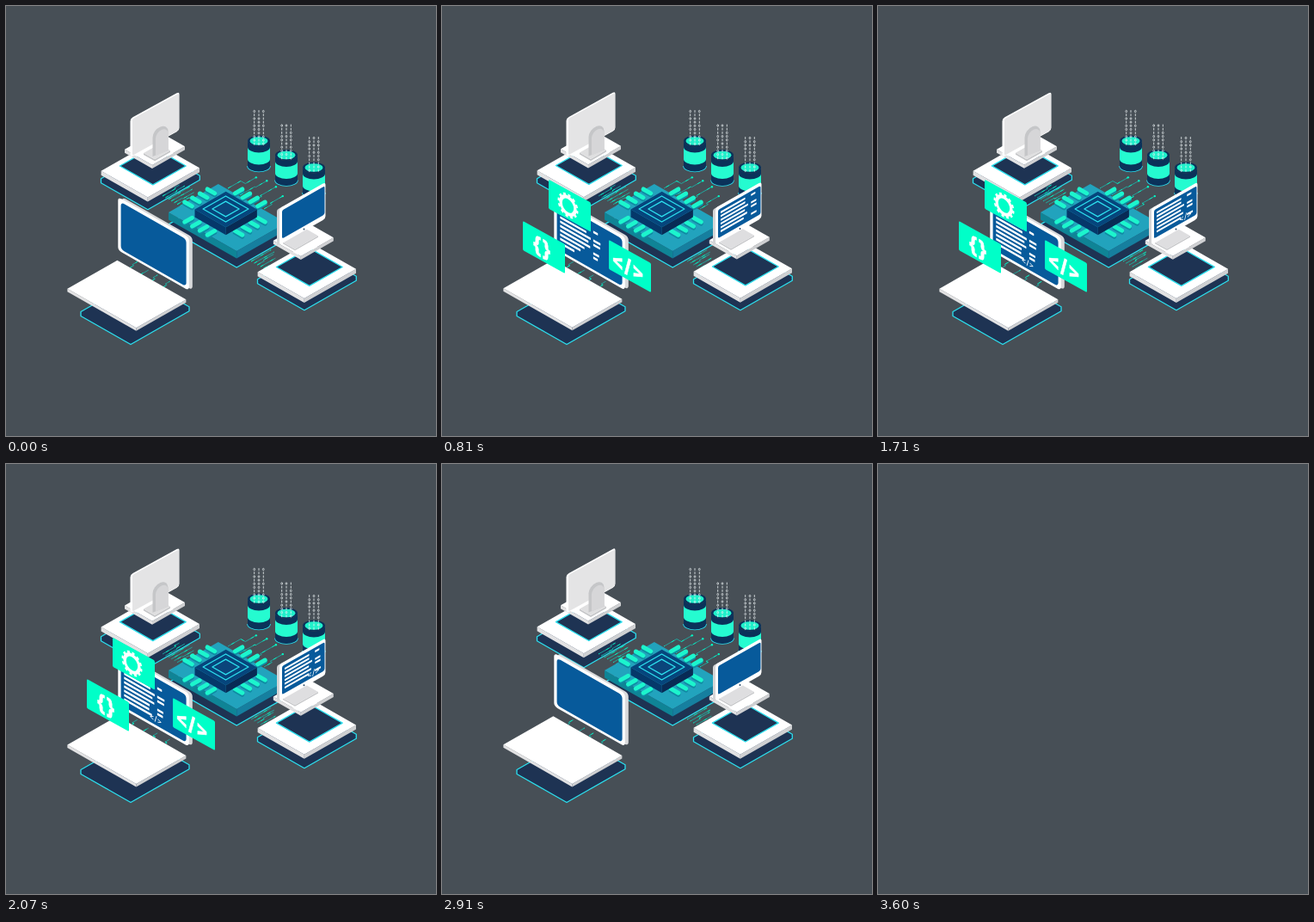
Write an HTML page that moves like this. It is 500 by 500 pixels and loops after 3630 ms.

```html
<!DOCTYPE html>
<html lang="en">
<head>
<meta charset="utf-8">
<title>Connected devices</title>
<style>
html, body { margin: 0; width: 100%; height: 100%; overflow: hidden; background: #474f56; }
svg { display: block; width: 100vw; height: 100vh; }
text { font-family: Inter, "Open Sans", sans-serif; font-weight: 800; text-anchor: middle; fill: #fff; }
</style>
</head>
<body>
<svg id="stage" viewBox="0 0 500 500"></svg>
<script>
const LOOP = 3630, STEP = 30, HOLD = 90, REST = 3420, BLANK = 3600;
const BOB = 2.7, BOB_PERIOD = (REST - HOLD) / 4;
const NAVY = '#1e3353', CYAN = '#2ce0ee', MINT = '#00ffc8', BLUE = '#075a9b', TEAL = '#1bb9ae';
const SLOPE = .57;
const stage = document.getElementById('stage');

let seed = 7;
const rand = () => (seed = seed * 16807 % 2147483647) / 2147483647;
const repeat = (n, f) => Array.from({ length: n }, (_, i) => f(i)).join('');

const group = (body, attrs) => `<g ${attrs}>${body}</g>`;
const at = (x, y, body) => group(body, `transform="translate(${x} ${y})"`);
const skew = (x, y, slope, body) => group(body, `transform="matrix(1 ${slope} 0 1 ${x} ${y})"`);
const rect = (x, y, w, h, rx, fill, more = '') =>
  `<rect x="${x}" y="${y}" width="${w}" height="${h}" rx="${rx}" fill="${fill}" ${more}/>`;
const path = (d, stroke, w, more = '') =>
  `<path d="${d}" fill="none" stroke="${stroke}" stroke-width="${w}" ${more}/>`;
const poly = (pts, fill, stroke = 'none', w = 1.3) =>
  `<polygon points="${pts.join(' ')}" fill="${fill}" stroke="${stroke}" stroke-width="${w}" stroke-linejoin="round"/>`;

// Ground point: a runs right and down, b runs right and up
const iso = (x, y, a, b) => [x + a + b, y + SLOPE * (a - b)];
const drop = ([x, y], d) => [x, y + d];
// Corners left, top, right, bottom of a tile with half sides a and b
const corners = (x, y, a, b) => [iso(x, y, -a, -b), iso(x, y, -a, b), iso(x, y, a, b), iso(x, y, a, -b)];
const tile = (x, y, a, b, fill, stroke) => poly(corners(x, y, a, b), fill, stroke);

function box(x, y, a, b, depth, top = '#fff', left = '#e2e2e3', right = '#cfd0d2') {
  const [l, , r, f] = corners(x, y, a, b);
  return poly([l, f, drop(f, depth), drop(l, depth)], left) +
    poly([f, r, drop(r, depth), drop(f, depth)], right) + tile(x, y, a, b, top);
}

function shadow(x, y, a, b) {
  const [l, t, r, f] = corners(x, y, a, b);
  return poly([l, t, r, drop(r, 5), drop(f, 5), drop(l, 5)], NAVY, CYAN);
}

// Parallel circuit tracks with a small jog in each
function tracks(x, y, n, gap, len, dots) {
  let d = '', ends = '';
  for (let i = 0; i < n; i++) {
    const a = i * gap, jog = (rand() - .5) * gap * .9, mid = len * (.3 + .4 * rand()), end = len * (.8 + .4 * rand());
    const pts = [iso(x, y, a, 0), iso(x, y, a, mid), iso(x, y, a + jog, mid), iso(x, y, a + jog, end)];
    d += 'M' + pts.join('L');
    if (dots) ends += `<circle cx="${pts[3][0]}" cy="${pts[3][1]}" r="1.2" fill="${MINT}"/>`;
  }
  return path(d, TEAL, .8) + path(d, MINT, .8, 'class="pulse" stroke-dasharray="4 9"') + ends;
}

function chip() {
  const x = 254.5, y = 239.6, near = 25, far = 33.5;
  const pins = repeat(4, i => {
    const s = 8.8 * (i - 1.5);
    return [-1, 1].map(k =>
      `M${iso(x, y, k * near, s)}L${iso(x, y, k * far, s)}M${iso(x, y, s, k * near)}L${iso(x, y, s, k * far)}`).join('');
  });
  return box(257.5, 246, 39.6, 28.9, 8.5, '#22a3bd', '#0f8496', '#167f9f') +
    at(0, 2, path(pins, '#0f8ba3', 5, 'stroke-linecap="round"')) +
    path(pins, '#1cf5cd', 5, 'stroke-linecap="round"') +
    box(255.7, 236.5, 18.1, 18.1, 9, '#06457c', '#05386a', '#082b55') +
    tile(255.5, 236, 13.2, 13.2, 'none', CYAN) + tile(255.5, 236, 7.8, 7.8, '#0b457b', CYAN);
}

function tank(x, y) {
  const band = (top, bottom, fill) =>
    `<path d="M-13 ${top}A13 6.5 0 0 0 13 ${top}V${bottom}A13 6.5 0 0 1 -13 ${bottom}z" fill="${fill}"/>`;
  const bits = repeat(30, i => {
    const cx = (i % 3 - 1) * 5.3, cy = -34.5 + Math.floor(i / 3) * 4.2;
    return rand() < .6
      ? `<ellipse cx="${cx}" cy="${cy}" rx=".9" ry="1.2" fill="none" stroke="#eef4f5" stroke-width=".7"/>`
      : path(`M${cx} ${cy - 1.4}v2.8`, '#eef4f5', .8);
  });
  return at(x, y, path('M-13 29A13 6.5 0 0 0 13 29', CYAN, 1.6) + band(0, 29, '#0b325a') + band(7, 21, '#25fbd0') +
    '<ellipse rx="13" ry="6.5" fill="#0b325a"/><ellipse rx="10.5" ry="4.8" fill="#20f0cb"/>' + bits);
}

const platform = (x, y) => box(x, y, 27.1, 30.1, 5) + tile(x + 3, y - 4, 19.2, 19.2, NAVY, CYAN);
const foot = (x, y) => box(x, y, 16, 19, 4);

function backMonitor() {
  const arch = 'M0 31V9a9 9 0 0 1 18 0v22z';
  return foot(173, 165) + box(175.5, 169.5, 6.5, 9, 2, '#dfdfe0', '#c4c5c7', '#c4c5c7') +
    skew(144.5, 131, -.55, rect(0, 0, 57, 45, 3, '#fff') + rect(2.5, 1.8, 54, 42.5, 2, '#e4e4e5')) +
    skew(170.5, 144, -.4, `<path d="${arch}" fill="#c5c6c8"/><path d="${arch}" fill="#d6d6d8" transform="translate(3.4 4) scale(.82 .88)"/>`);
}

// Ragged lines of code, some with a second piece at the right
function code(x, y, n, pitch, w, h) {
  return repeat(n, i => {
    const first = w * (.6 + .16 * rand());
    const row = (from, len) => rect(x + from, y + i * pitch, 0, h, .4, '#fff', `class="row" data-i="${i}" data-w="${len}"`);
    return row(0, first) + (i % 3 !== 1 ? row(w * .82, w * (.1 + .08 * rand())) : '');
  }) + `<text class="tag" x="${x + w * .78}" y="${y + n * pitch + 1}" font-size="8.5" style="font-weight:500">&lt;/&gt;</text>`;
}

function deskMonitor() {
  return foot(345.8, 271) + box(342.5, 271, 7, 13.5, 1.5, '#dedee0', '#c4c5c7', '#c4c5c7') +
    skew(315, 237, -SLOPE, rect(0, 0, 8, 42, 2, '#d4d5d7') + rect(3, 0, 53.5, 42.5, 3, '#fff') +
      rect(6, 4, 49.5, 33, 2, BLUE) + code(9, 7.4, 6, 4.4, 43, 2.3)) +
    '<circle cx="346.5" cy="259.5" r="1" fill="#274866"/>';
}

function laptop() {
  return box(140.4, 335, 40, 29, 3.5) +
    skew(130.3, 222, SLOPE, rect(4.5, -2.5, 82, 61.5, 4, '#d9dadc') + rect(0, 0, 82.5, 62, 4, '#fff') +
      rect(3.3, 4, 76, 55, 4, BLUE) + code(7, 13.7, 8, 5, 47, 2.7));
}

const gear = '<g fill="none" stroke="#fff"><circle r="9.7" stroke-width="4"/>' +
  '<circle r="12.2" stroke-width="3.2" pathLength="24" stroke-dasharray="1.05 .95"/></g>';
const label = (s, size) =>
  `<text y="${size * .37}" font-size="${size}" letter-spacing="1" stroke="#fff" stroke-width=".5">${s}</text>`;
const cards = [
  { x: 148.5, y: 232.2, icon: gear },
  { x: 218.5, y: 302.5, icon: label('&lt;/&gt;', 23) },
  { x: 118.5, y: 280.5, icon: label('{}', 25) }
];
const card = ({ icon }) => group(skew(0, 0, .55, rect(-24.5, -17, 49, 34, 1.5, MINT) +
  group(icon, 'transform="translate(-2 1) scale(.87 1)"')), 'class="card"');
const bob = body => group(body, 'class="bob"');

stage.innerHTML = group(
  shadow(167.9, 199, 27.2, 30.2) + shadow(150, 352.6, 29, 34) +
  shadow(349.9, 316, 27.2, 30.2) + shadow(257.5, 260, 39.6, 28.9) +
  tracks(182, 221, 8, 3.4, 23) + tracks(258, 212, 4, 14, 26, true) +
  tracks(285, 297, 5, 3.6, 20) + tracks(143, 305, 4, 13, 10) +
  chip() + repeat(3, i => tank(294 + 32 * i, 157 + 15.5 * i + (i % 2))) +
  bob(platform(167.8, 190) + backMonitor()) +
  bob(platform(349.8, 307.5) + deskMonitor()) +
  bob(laptop()) + cards.map(card).join(''), 'id="scene"');

const all = sel => [...stage.querySelectorAll(sel)];
const [scene] = all('#scene');
const pulses = all('.pulse'), bobs = all('.bob'), rows = all('.row'), tags = all('.tag'), cardEls = all('.card');

const clamp = v => Math.max(0, Math.min(1, v));
const ease = v => 1 - (1 - clamp(v)) ** 3;

function draw(now) {
  const t = Math.floor((now % LOOP) / STEP) * STEP;
  scene.setAttribute('visibility', t >= BLANK ? 'hidden' : 'visible');

  const run = Math.max(0, Math.min(t, REST) - HOLD);
  const lift = BOB * (1 - Math.cos(2 * Math.PI * run / BOB_PERIOD)) / 2;
  bobs.forEach(g => g.setAttribute('transform', `translate(0 ${-lift})`));
  pulses.forEach(p => p.setAttribute('stroke-dashoffset', -run * .022));

  cards.forEach(({ x, y }, i) => {
    const k = ease((t - 120 - i * 75) / 270) * (1 - clamp((t - 2660 + i * 40) / 210) ** 3);
    cardEls[i].setAttribute('transform', `translate(${x} ${y}) scale(${k})`);
  });

  rows.forEach(r => {
    const { i, w } = r.dataset;
    const k = ease((t - 450 - i * 45) / 210) * (1 - clamp((t - 2490 - i * 15) / 180));
    r.setAttribute('width', w * k);
  });
  const alpha = clamp((t - 930) / 180) * (1 - clamp((t - 2640) / 150));
  tags.forEach(e => e.setAttribute('opacity', alpha));
}

const start = performance.now();
function tick() {
  draw(performance.now() - start);
  requestAnimationFrame(tick);
}
tick();
</script>
</body>
</html>
```
